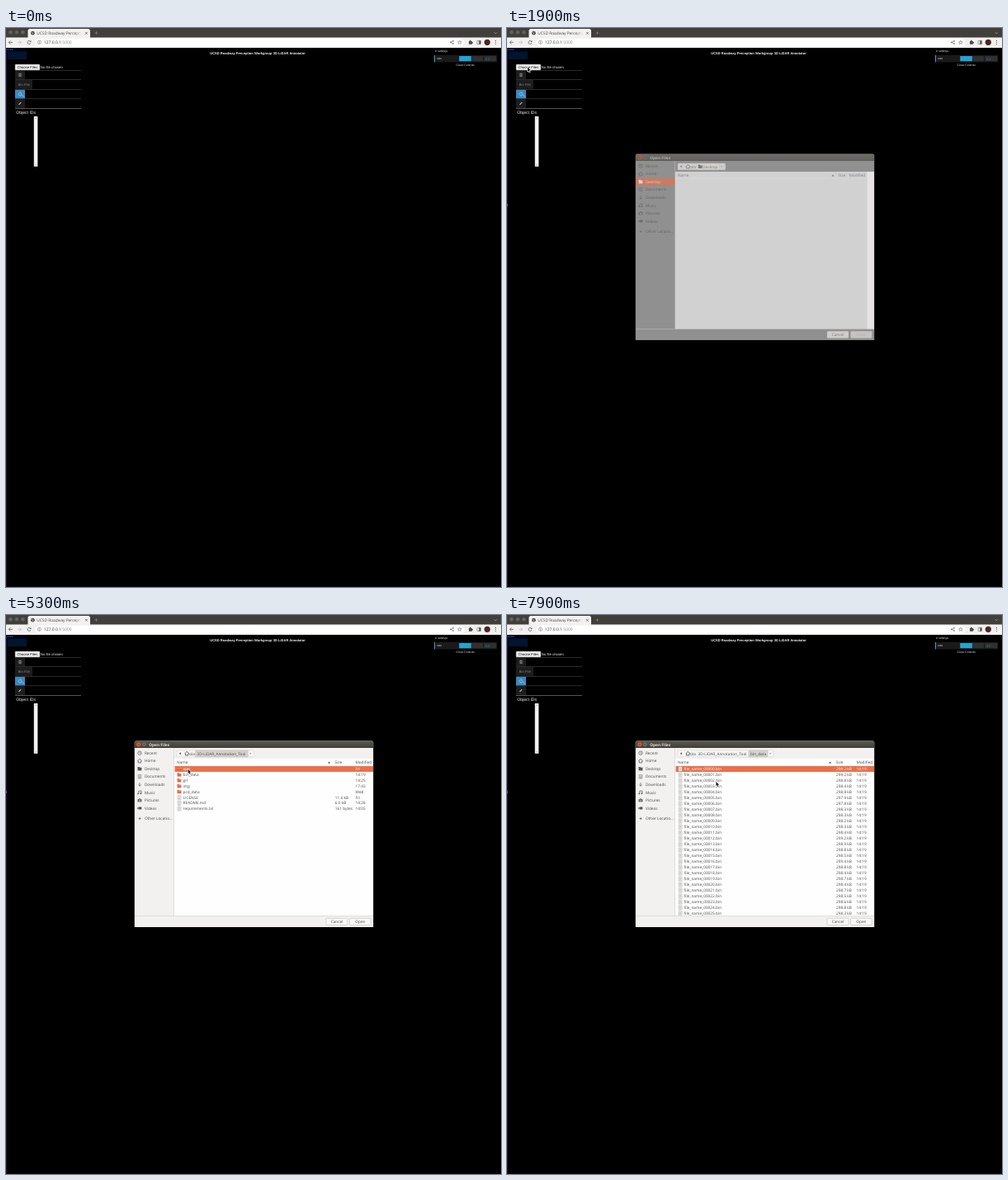
Recreate the animation shown at these times as an HTML page with a canvas. Size 600x677 px, loop 8 s.

```html
<!DOCTYPE html>
<html lang="en">
<head>
<meta charset="utf-8">
<title>3D LiDAR Annotator</title>
<style>
html, body { margin: 0; width: 100%; height: 100%; overflow: hidden; background: #000; }
canvas { display: block; width: 600px; height: 677px; }
</style>
</head>
<body>
<canvas id="stage" width="600" height="677"></canvas>
<script>
const ctx = document.getElementById('stage').getContext('2d');
const LOOP = 8000, STEP = 100;
const UI = '"Open Sans", "Noto Sans", sans-serif';
const PAGE = '"Liberation Sans", Arial, sans-serif';
const ORANGE = '#e9704a', INK = '#4a4a48';

// ---- drawing helpers ----
function rect(x, y, w, h, color) {
  ctx.fillStyle = color;
  ctx.fillRect(x, y, w, h);
}
function round(x, y, w, h, r, fill, line) {
  ctx.beginPath();
  ctx.roundRect(x, y, w, h, r);
  if (fill) { ctx.fillStyle = fill; ctx.fill(); }
  if (line) { ctx.strokeStyle = line; ctx.lineWidth = 0.5; ctx.stroke(); }
}
function disc(x, y, r, fill) {
  ctx.beginPath();
  ctx.arc(x, y, r, 0, Math.PI * 2);
  ctx.fillStyle = fill;
  ctx.fill();
}
function ring(x, y, r, color, from = 0, to = Math.PI * 2, width = 0.7) {
  ctx.beginPath();
  ctx.arc(x, y, r, from, to);
  ctx.strokeStyle = color;
  ctx.lineWidth = width;
  ctx.stroke();
}
function trace(points) {
  ctx.beginPath();
  for (let i = 0; i < points.length; i += 2) ctx.lineTo(points[i], points[i + 1]);
}
function line(points, color, width = 0.7) {
  trace(points);
  ctx.strokeStyle = color;
  ctx.lineWidth = width;
  ctx.stroke();
}
function poly(points, color) {
  trace(points);
  ctx.fillStyle = color;
  ctx.fill();
}
// y is the middle of the capitals
function text(str, x, y, size, color, font = UI, { weight = 400, align = 'left' } = {}) {
  ctx.font = `${weight} ${size}px ${font}`;
  ctx.textAlign = align;
  ctx.fillStyle = color;
  ctx.fillText(str, x, y + size * 0.36);
}
const label = (str, x, y, color = INK) => text(str, x, y, 4.75, color);

// ---- browser ----
function drawBrowser(focused) {
  rect(0, 0, 600, 12, '#403f3b');
  [5.5, 13, 20.5].forEach((x, i) => {
    disc(x, 5.2, 2.6, focused && i === 0 ? '#e2592f' : '#63625c');
    ring(x, 5.2, 2.6, '#33322e', 0, 7, 0.4);
  });
  round(26.5, 1, 75.5, 14, [2.5, 2.5, 0, 0], '#f3f2f0');
  disc(32.4, 6.2, 2.4, '#4d5054');
  line([31, 5.4, 32.6, 6, 32, 7.5], '#e8e8e8', 0.6);
  text('UCSD Roadway Perception', 37.3, 6.2, 4.8, '#45484c');
  const fade = ctx.createLinearGradient(83, 0, 92, 0);
  fade.addColorStop(0, 'rgba(243,242,240,0)');
  fade.addColorStop(1, '#f3f2f0');
  rect(83, 2, 18, 9, fade);
  line([96, 4.8, 98.8, 7.6], '#444');
  line([98.8, 4.8, 96, 7.6], '#444');
  const plus = focused ? '#d0cec8' : '#85837d';
  line([107.6, 6, 111.4, 6], plus);
  line([109.5, 4.1, 109.5, 7.9], plus);
  line([591.8, 5.4, 593.3, 6.9, 594.8, 5.4], '#b5b3ad');

  rect(0, 11.5, 600, 12.5, '#f2f1ef');
  round(35.5, 12.7, 520, 9.8, 4.9, '#fff');
  line([8, 17.4, 3.4, 17.4], '#4d5054');
  line([5.5, 15.2, 3.3, 17.4, 5.5, 19.6], '#4d5054');
  line([14, 17.4, 18.6, 17.4], '#b9b9b7');
  line([16.5, 15.2, 18.7, 17.4, 16.5, 19.6], '#b9b9b7');
  ring(28, 17.4, 2, '#4d5054', 0.3, 5.4);
  poly([28.4, 16.9, 30.4, 16.9, 30.4, 14.9], '#4d5054');
  ring(40.5, 17.3, 2.1, '#5b5e62', 0, 7, 0.5);
  rect(40.2, 16.9, 0.6, 1.6, '#5b5e62');
  rect(40.2, 15.9, 0.6, 0.6, '#5b5e62');
  text('127.0.0.1', 45.8, 17.4, 5, '#303235');
  const hostWidth = ctx.measureText('127.0.0.1').width;
  text(':5000', 45.8 + hostWidth, 17.4, 5, '#85888b');

  line([542, 15.8, 539, 17.4, 542, 19], '#5b5e62', 0.5);
  [[542, 15.8], [539, 17.4], [542, 19]].forEach(([x, y]) => disc(x, y, 0.8, '#5b5e62'));
  const star = [];
  for (let i = 0; i <= 10; i++) {
    const r = i % 2 ? 1.1 : 2.4, a = i * Math.PI / 5 - Math.PI / 2;
    star.push(549.9 + r * Math.cos(a), 17.4 + r * Math.sin(a));
  }
  line(star, '#5b5e62', 0.5);
  rect(561, 16, 3.9, 3.7, '#4a4d51');
  disc(562.8, 15.7, 1, '#4a4d51');
  disc(565, 17.8, 1, '#4a4d51');
  round(571, 15.3, 4.4, 4.2, 0.5, null, '#4a4d51');
  rect(573.3, 15.3, 2.1, 4.2, '#4a4d51');
  disc(583.3, 17.3, 3.6, '#4b2528');
  [15.4, 17.3, 19.2].forEach(y => disc(593.5, y, 0.55, '#4a4d51'));
}

// ---- web page ----
function drawPage(hover) {
  rect(0, 24, 600, 653, '#000');
  rect(0, 24, 0.9, 653, '#35103a');
  rect(0, 676.3, 600, 0.7, '#1c0a20');

  rect(1, 24, 24.5, 14.5, '#000314');
  text('0 FPS', 1.3, 25.8, 2.6, '#3a79c4', PAGE, { weight: 700 });
  rect(2, 28.5, 23, 9.5, '#02142e');

  text('UCSD Roadway Perception Workgroup 3D LiDAR Annotator', 305, 30.4, 4.07, '#f4f4f4', PAGE,
    { weight: 700, align: 'center' });

  round(11, 44, 30, 7, 0.8, hover ? '#e3e3e3' : '#f0f0f0', '#777');
  text('Choose Files', 13.4, 47.5, 4.27, '#000', PAGE);
  text('No file chosen', 41.8, 47.5, 4.27, '#eee', PAGE);

  rect(11, 51.6, 12, 10.4, '#1d1d1d');
  rect(11, 63, 21, 10.8, '#1d1d1d');
  rect(11, 74.8, 12, 10.6, '#3c88c2');
  rect(11, 86.2, 12, 10.8, '#1d1d1d');
  [51.1, 62.3, 74.1, 85.5].forEach(y => rect(11, y, 80, 0.6, '#474747'));
  rect(11, 97, 80, 0.7, '#777');
  round(15.3, 55.1, 3.4, 3.6, 0.3, null, '#999');
  rect(16.1, 55.2, 1.8, 1.2, '#999');
  rect(16, 57.2, 2, 1.4, '#888');
  text('Bin File', 14.8, 68.5, 4.2, '#858585', PAGE);
  ring(17.2, 80, 2, '#a9d3ef', 0.6, 5.6, 0.7);
  line([17.5, 79, 20, 81.5, 21.8, 83.5], '#b8dcf2', 0.7);
  line([15.4, 92.9, 18.2, 90.1], '#bbb', 1.2);
  text('Object IDs', 12.2, 102.1, 5.12, '#f0f0f0', PAGE);
  rect(33.8, 107, 4.6, 60.8, '#f3f3f3');
  poly([35.3, 109.4, 36.9, 109.4, 36.1, 108.3], '#777');
  poly([35.3, 165.5, 36.9, 165.5, 36.1, 166.6], '#777');

  poly([520, 27.4, 522, 27.4, 521, 29], '#ddd');
  text('settings', 523.2, 28.2, 3.5, '#e6e6e6', PAGE);
  rect(519, 32.8, 76, 8.6, '#1a1a1a');
  rect(519, 32.8, 1, 8.6, '#2fa1d6');
  text('size', 522, 37.1, 3.5, '#ddd', PAGE);
  rect(549.3, 34, 28.7, 6.2, '#303030');
  rect(549.3, 34, 14.5, 6.2, '#22a5d3');
  rect(579.3, 34, 15, 6.2, '#303030');
  text('0.2', 581, 37.1, 3.9, '#2784ac', PAGE);
  text('Close Controls', 556.8, 44.6, 3.45, '#e6e6e6', PAGE, { align: 'center' });
}

// ---- file dialog ----
const folder = (name, date, emblem) => ({ name, date, emblem, dir: true });
const file = (name, size, date) => ({ name, size, date });

const homeRows = [
  folder('3D-LiDAR_Annotation_Tool', '14:15'), folder('3D-LiDAR-annotator', 'Fri'),
  folder('3D-LiDAR-annotator_V1', 'Wed'), folder('anaconda3', '6 Jul'),
  folder('avl_dockerlogin', 'Thu'), folder('bagfiles', '16:22'),
  folder('Desktop', '14:32', '#5b3a64'), folder('Documents', '8 Jul', '#f3e4dc'),
  folder('Downloads', '14:32', '#f3e4dc'), folder('latte', 'Wed'),
  folder('LiDAR_Annotation_Tool', '12 Jul'), folder('lidar_bin', 'Wed'),
  folder('lidar_pcd', 'Wed'), folder('Linux Command Notes', '12 Jul'),
  folder('Music', '1 Jul', '#5c4b48'), folder('Pictures', '1 Jul', '#5c4b48'),
  folder('Public', '1 Jul', '#f3e4dc'), folder('some_ws', '6 Jul'),
  folder('Templates', '1 Jul', '#f3e4dc'), folder('Videos', '14:33', '#5c4b48'),
  file('examples.desktop', '9.0 kB', '1 Jul'), file('get-pip.py', '1.9 MB', '6 Jul'),
  file('obj_trck.mat', '25.2 kB', '8 Jul'), file('test.csv', '25.2 kB', '11 Jul')
];
const toolRows = [
  folder('app', 'Fri'), folder('bin_data', '14:19'), folder('gif', '14:25'),
  folder('img', '17:43'), folder('pcd_data', 'Wed'),
  file('LICENSE', '11.4 kB', 'Fri'), file('README.md', '6.0 kB', '14:28'),
  file('requirements.txt', '161 bytes', '14:05')
];
// tenths of a kB above 297
const extra = [22, 22, 18, 14, 18, 9, 8, 13, 13, 12, 13, 14, 22, 19, 18, 15, 24, 18, 14, 17, 14, 17, 15, 16, 18, 13];
const binRows = extra.map((n, i) =>
  file(`file_name_${String(i).padStart(5, '0')}.bin`, `${(297 + n / 10).toFixed(1)} kB`, '14:19'));

const toolCrumb = { name: '3D-LiDAR_Annotation_Tool', x: 229.6, w: 63.6 };
const binCrumb = { name: 'bin_data', x: 293, w: 23 };
const deskCrumb = { name: 'Desktop', x: 229.8, w: 27.4, icon: true };
const views = {
  desktop: { place: 2, crumbs: [deskCrumb], active: 1, rows: [], sizeX: 401.5, dateX: 414.5, sort: 395 },
  home: { place: 1, crumbs: [deskCrumb], active: 0, rows: homeRows, pitch: 6.75, sizeX: 403, sort: 396.3 },
  tool: { crumbs: [toolCrumb], active: 1, rows: toolRows, pitch: 6.86, sizeX: 398.4, sort: 391.6 },
  empty: { crumbs: [toolCrumb, binCrumb], active: 2, rows: [], sizeX: 398.4 },
  bin: { crumbs: [toolCrumb, binCrumb], active: 2, rows: binRows, pitch: 7, sizeX: 398.6, sort: 391.6 }
};
const places = ['Recent', 'Home', 'Desktop', 'Documents', 'Downloads', 'Music', 'Pictures', 'Videos'];

function house(x, y, color) {
  line([x - 2.7, y + 0.2, x, y - 2.3, x + 2.7, y + 0.2], color, 0.8);
  line([x - 1.7, y, x - 1.7, y + 2.2, x + 1.7, y + 2.2, x + 1.7, y], color, 0.8);
}
function folderShape(x, y, color, tab = color) {
  rect(x, y - 2.2, 2.2, 1.5, tab);
  rect(x, y - 1.5, 4.8, 3.7, color);
}
function placeIcon(i, y, c) {
  const x = 162;
  if (i === 0) { ring(x, y, 2.2, c); line([x, y - 1.2, x, y + 0.2, x + 1, y + 0.2], c, 0.5); }
  if (i === 1) house(x, y, c);
  if (i === 2) folderShape(x - 2.4, y, c);
  if (i === 3) {
    round(x - 1.8, y - 2.2, 3.6, 4.4, 0.2, null, c);
    [-0.9, 0.1, 1.1].forEach(d => rect(x - 1, y + d, 2, 0.4, c));
  }
  if (i === 4) { line([x, y - 2.2, x, y + 1.8], c); line([x - 1.5, y + 0.3, x, y + 1.9, x + 1.5, y + 0.3], c); }
  if (i === 5) {
    line([x - 1.2, y + 1.5, x - 1.2, y - 1.8, x + 2, y - 1.8, x + 2, y + 1.2], c);
    disc(x - 1.8, y + 1.5, 0.9, c);
    disc(x + 1.4, y + 1.3, 0.9, c);
  }
  if (i === 6) {
    rect(x - 2.4, y - 1.3, 4.8, 3.2, c);
    rect(x - 1, y - 2, 2, 1, c);
    ring(x, y + 0.3, 0.9, '#f2f1f0', 0, 7, 0.5);
  }
  if (i === 7) { rect(x - 1.3, y - 1.5, 3.6, 3, c); poly([x - 2.7, y - 1.2, x - 0.8, y, x - 2.7, y + 1.2], c); }
}

function drawSidebar(selected) {
  places.forEach((name, i) => {
    const y = 167.1 + i * 9.55, on = i === selected;
    if (on) rect(156, y - 4.7, 47, 9.3, ORANGE);
    placeIcon(i, y, on ? '#fff' : '#555');
    label(name, 167.9, y, on ? '#fff' : INK);
  });
  line([160.6, 246.5, 163.6, 246.5], '#555');
  line([162.1, 245, 162.1, 248], '#555');
  label('Other Locatio…', 167.9, 246.5);
}

function drawPath({ crumbs, active }) {
  const end = crumbs[crumbs.length - 1];
  round(207, 164, end.x + end.w + 7.5 - 207, 7.8, 1, '#f7f6f5', '#d3d0cb');
  poly([211.8, 166.3, 211.8, 169.3, 209.9, 167.8], '#444');
  const button = (x, w, on) => { if (on) round(x, 164, w, 7.8, 0.6, '#d6d3ce', '#b4b0aa'); };
  button(215.2, 14.3, active === 0);
  house(219.3, 167.7, '#444');
  label('ola', 222.2, 167.8);
  crumbs.forEach((c, i) => {
    button(c.x, c.w, active === i + 1);
    if (c.icon) folderShape(231.8, 167.8, '#444');
    label(c.name, c.x + (c.icon ? 7.3 : 2), 167.8);
  });
  const x = end.x + end.w + 3.2;
  poly([x - 0.6, 166.6, x - 0.6, 169, x + 0.9, 167.8], '#8a8884');
}

function rowIcon(row, y) {
  if (row.dir) {
    folderShape(207.6, y, '#e2683f', '#8e7a72');
    if (row.emblem) rect(208.9, y - 0.8, 2.4, 2, row.emblem);
    else rect(207.6, y - 1.2, 4.8, 0.6, '#f0a184');
    return;
  }
  round(208, y - 2.7, 4.1, 5.4, 0.3, '#ecebe9', '#b5b3b0');
  [-1.1, 0.1, 1.3].forEach(d => rect(208.9, y + d, 2.3, 0.4, '#a9a7a4'));
}

function drawList(view, selected) {
  const { rows, pitch, sizeX, dateX = 423.4, sort } = view;
  rect(204, 174, 241, 190.5, '#fefefe');
  if (dateX < 420) rect(436.6, 174, 8.4, 190.5, '#f2f1f0');
  rect(203.4, 161, 0.6, 203.5, '#d6d3cf');
  rect(204, 182.5, 241, 0.5, '#e4e2df');
  label('Name', 207, 178.7);
  label('Size', sizeX, 178.7);
  label('Modified', dateX, 178.7);
  if (sort) poly([sort - 1.5, 179.4, sort + 1.5, 179.4, sort, 177.6], '#444');
  ctx.save();
  ctx.beginPath();
  ctx.rect(204, 174, 241, 190.3);
  ctx.clip();
  rows.forEach((row, i) => {
    const y = 186.5 + i * pitch, on = i === selected;
    if (on) rect(204.6, y - pitch / 2, 240.4, pitch, ORANGE);
    const color = on ? '#fff' : INK;
    rowIcon(row, y);
    label(row.name, 214.6, y, color);
    if (row.size) label(row.size, sizeX + 0.4, y, color);
    label(row.date, 423.6, y, color);
  });
  ctx.restore();
}

function drawDialog(view, selected, canOpen) {
  round(155.8, 152.4, 289.4, 225.6, [2, 2, 0, 0], '#f2f1f0');
  const bar = ctx.createLinearGradient(0, 152.4, 0, 161);
  bar.addColorStop(0, '#5b5951');
  bar.addColorStop(1, '#3f3e39');
  round(155.8, 152.4, 289.4, 8.7, [2, 2, 0, 0], bar);
  disc(160.8, 156.8, 2.6, '#e2592f');
  line([159.8, 155.8, 161.8, 157.8], '#6b2a15', 0.6);
  line([161.8, 155.8, 159.8, 157.8], '#6b2a15', 0.6);
  disc(167.3, 156.8, 2.4, '#77756d');
  disc(167.3, 156.8, 1, '#484741');
  text('Open Files', 173.2, 157, 4.8, '#e3dfd6', UI, { weight: 700 });

  drawSidebar(view.place);
  drawPath(view);
  drawList(view, selected);
  rect(156, 364.3, 289, 0.6, '#d3d0cb');
  round(388, 367.3, 26, 8.3, 1.2, '#f9f8f7', '#b7b3ad');
  text('Cancel', 401, 371.5, 4.75, INK, UI, { align: 'center' });
  round(416.6, 367.3, 25.6, 8.3, 1.2, canOpen ? '#f9f8f7' : '#e9e7e4', '#b7b3ad');
  text('Open', 429.4, 371.5, 4.75, canOpen ? INK : '#a5a3a0', UI, { align: 'center' });
}

// ---- pointer ----
const pointerPath = [
  [200, 441, 145], [700, 28.3, 52], [800, 28.3, 52], [1400, 25, 47.6],
  [2100, 25, 47.6], [2700, 221, 175], [3000, 207.6, 177],
  [3500, 174, 188], [3900, 178.6, 176.6], [4300, 178.6, 176.6],
  [4900, 220, 186], [5000, 220, 186], [5100, 220.6, 186.8],
  [5600, 220.6, 186.8], [6000, 230.6, 193.8], [6700, 230.6, 193.8],
  [7100, 236, 189.5], [7600, 251, 185], [7700, 251, 185], [7900, 253.4, 202]
];
function pointerAt(t) {
  const next = pointerPath.findIndex(p => p[0] > t);
  if (next < 0) return pointerPath[pointerPath.length - 1].slice(1);
  const [t0, x0, y0] = pointerPath[next - 1], [t1, x1, y1] = pointerPath[next];
  const u = (t - t0) / (t1 - t0), e = u * u * (3 - 2 * u);
  return [x0 + (x1 - x0) * e, y0 + (y1 - y0) * e];
}
function drawPointer(t) {
  if (t < 200) return;
  const [x, y] = pointerAt(t);
  ctx.save();
  ctx.translate(x, y);
  trace([0, 0, 0, 5.2, 1.2, 4.1, 2.1, 6.1, 3, 5.7, 2.1, 3.7, 3.8, 3.6]);
  ctx.closePath();
  ctx.lineJoin = 'round';
  ctx.strokeStyle = '#fff';
  ctx.lineWidth = 1.1;
  ctx.stroke();
  ctx.fillStyle = '#1a1a1a';
  ctx.fill();
  ctx.restore();
}

// ---- timeline ----
function viewAt(t) {
  if (t < 4300) return views.desktop;
  if (t < 5300) return views.home;
  if (t < 6500) return views.tool;
  return t < 6700 ? views.empty : views.bin;
}
function draw(t) {
  const view = viewAt(t);
  drawBrowser(t >= 1700 && t < 1900);
  drawPage(t >= 1000 && t < 1900);
  if (t >= 1700) rect(0, 213.5, 1, 2, '#8d5c92');
  if (t >= 1900) {
    ctx.globalAlpha = t < 2000 ? 0.6 : 1;
    drawDialog(view, t >= 6300 && view === views.tool ? 1 : 0, view.rows.length > 0);
    ctx.globalAlpha = 1;
  }
  drawPointer(t);
}

ctx.textRendering = 'geometricPrecision';
const start = performance.now();
function tick() {
  const t = (performance.now() - start) % LOOP;
  draw(Math.floor(t / STEP) * STEP);
  requestAnimationFrame(tick);
}
tick();
</script>
</body>
</html>
```
